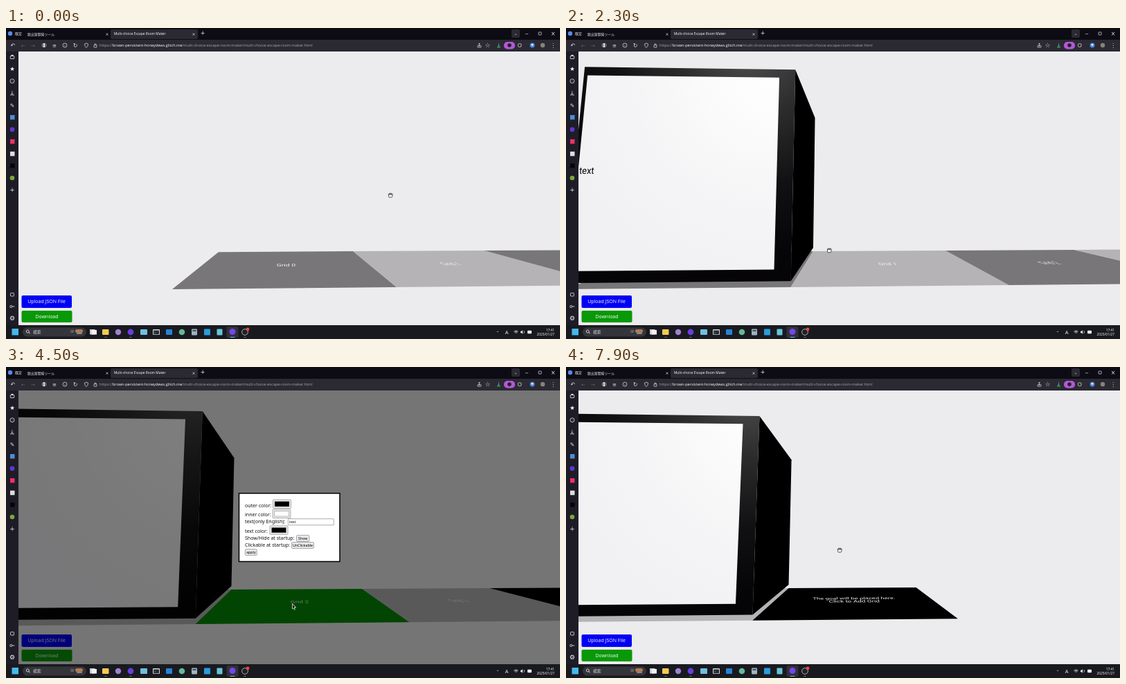
These frames come from a looping animation (800x450 px, 8000 ms). An HTML page with a canvas:

```html
<!DOCTYPE html>
<html lang="ja">
<head>
<meta charset="utf-8">
<title>Room maker</title>
<style>
html, body { margin: 0; width: 100%; height: 100%; overflow: hidden; background: #ecebee }
canvas { display: block; width: 800px; height: 450px }
</style>
</head>
<body>
<canvas id="stage" width="800" height="450"></canvas>
<script>
const g = document.getElementById('stage').getContext('2d');
const UI = '"Open Sans", "Noto Sans", "Noto Sans CJK JP", "Noto Sans CJK", sans-serif';
const SYMBOL = '"DejaVu Sans", sans-serif';
const FORM = '"Noto Sans", "Open Sans", sans-serif';
const LOOP = 8000;

// Time, camera offset
const pan = [[0, 0], [350, 40], [1450, 40], [1700, 109], [2300, 245], [3400, 245], [3700, 330],
  [4300, 628], [5400, 628], [5700, 717], [6100, 909], [7100, 909], [7350, 960], [7900, 1294], [8000, 1310]];
// Time, pointer x, pointer y
const pointer = [[0, 555, 242], [250, 520, 250], [500, 405, 345], [700, 405, 345], [1200, 360, 269],
  [1400, 360, 269], [1550, 452, 288], [1700, 383, 293], [2100, 300, 292], [2450, 440, 344], [2700, 438, 342],
  [3150, 360, 270], [3350, 360, 270], [3600, 560, 270], [4200, 330, 290], [4400, 414, 346], [4600, 414, 346],
  [5100, 360, 270], [5350, 360, 270], [5550, 545, 255], [5700, 461, 257], [6000, 300, 270], [6200, 440, 343],
  [6450, 440, 340], [6850, 361, 270], [7050, 361, 270], [7300, 640, 255], [7900, 395, 265], [8000, 385, 266]];
// When the dialog of each tile opens and is applied
const dialogs = [[500, 1400], [2500, 3400], [4450, 5400], [6200, 7100]];

let camera = 0;

function at(keys, t) {
  let i = 1;
  while (i < keys.length - 1 && keys[i][0] < t) i++;
  const a = keys[i - 1], b = keys[i];
  let p = Math.min(1, Math.max(0, (t - a[0]) / (b[0] - a[0])));
  return a.slice(1).map((v, j) => v + (b[j + 1] - v) * p);
}

function project(x, y, z) {
  const w = 1 + .023 * x + .081 * y + .675 * z;
  return [(240 + 337 * x + 33.5 * y + 274 * z - camera) / w,
          (378 + 5.6 * x - 309 * y + 165 * z) / w];
}

function poly(points, fill) {
  g.fillStyle = fill;
  g.beginPath();
  points.forEach(p => g.lineTo(...p));
  g.closePath();
  g.fill();
}

const face = (points, fill) => poly(points.map(p => project(...p)), fill);

function box(x, y, w, h, fill, r = 0, line) {
  g.beginPath();
  g.roundRect(x, y, w, h, r);
  if (fill) { g.fillStyle = fill; g.fill(); }
  if (line) { g.strokeStyle = line; g.stroke(); }
}

function dot(x, y, r, fill, line) {
  g.beginPath();
  g.arc(x, y, r, 0, 7);
  if (fill) { g.fillStyle = fill; g.fill(); }
  if (line) { g.strokeStyle = line; g.stroke(); }
}

function text(s, x, y, size, fill, align = 'left', font = UI) {
  g.font = size + 'px ' + font;
  g.fillStyle = fill;
  g.textAlign = align;
  g.textBaseline = 'alphabetic';
  g.fillText(s, x, y);
  return x + g.measureText(s).width;
}

const symbol = (s, x, y, size = 8, fill = '#e8e8ee') => text(s, x, y + size * .36, size, fill, 'center', SYMBOL);

// Text lying on a plane, with its own right and up directions
function planeText(s, origin, up, em, emUp, fill, align) {
  const e = .01, o = project(...origin);
  const r = project(origin[0] + e, origin[1], origin[2]);
  const u = project(...origin.map((v, i) => v + up[i] * e));
  const kx = em / 10 / e, ky = -emUp / 10 / e;
  g.save();
  g.transform((r[0] - o[0]) * kx, (r[1] - o[1]) * kx, (u[0] - o[0]) * ky, (u[1] - o[1]) * ky, ...o);
  text(s, 0, 0, 10, fill, align, 'Roboto, sans-serif');
  g.restore();
}

function glow(x, y, r, stops) {
  const c = g.createRadialGradient(x, y, 0, x, y, r);
  stops.forEach((s, i) => c.addColorStop(i / (stops.length - 1), s));
  return c;
}

function tile(i, open) {
  const goal = i === 4;
  const fill = goal ? '#000' : open === i ? '#058c05' : i % 2 ? '#b5b3b5' : '#787678';
  face([[i, 0, 0], [i + 1, 0, 0], [i + 1, 0, 1], [i, 0, 1]], fill);
  const lines = goal ? ['The goal will be placed here.', 'Click to Add Grid'] : ['Grid ' + i];
  lines.forEach((s, n) => planeText(s, [i + .5, 0, (goal ? .52 : .47) - n * .1], [0, 0, 1], .042, .11, '#f4f4f4', 'center'));
}

function cube(i) {
  const lo = .026, hi = 1.026, m = .064, f = -.06;
  face([[i + 1, lo, 0], [i + 1, lo, 1], [i + 1, hi, 1], [i + 1, hi, 0]], '#000');
  face([[i, lo, 0], [i + 1, lo, 0], [i + 1, hi, 0], [i, hi, 0]],
    glow(265, 30, 300, ['#505050', '#2c2c2d', '#111113', '#050507']));
  face([[i + m, lo + m, f], [i + 1 - m, lo + m, f], [i + 1 - m, hi - m, f], [i + m, hi - m, f]],
    glow(300, 60, 330, ['#fff', '#fafafa', '#f4f3f5', '#f1f0f3']));
  planeText('text', [i + .074, .508, -.067], [0, 1, 0], .038, .0415, '#000', 'left');
}

function scene(t, open) {
  box(18, 34, 782, 396, '#ecebee');
  for (let i = 0; i < 5; i++) tile(i, open);
  dialogs.forEach((d, i) => t >= d[1] && cube(i));
  box(22.5, 387, 72.5, 18, '#0000f4', 2);
  text('Upload JSON File', 58.5, 398.3, 7, '#fff', 'center');
  box(22.5, 409, 73, 17, '#089808', 2);
  text('Download', 59, 420, 7, '#fff', 'center');
}

function dialog(pressed) {
  const ink = '#111', edge = '#777';
  const swatch = (x, y, fill) => {
    box(x, y, 26, 12.5, '#efeff0', 1, edge);
    box(x + 2.5, y + 2.5, 21, 7.5, fill, 0, '#888');
  };
  const button = (s, x, y, w, fill = '#e9e9ed') => {
    box(x, y, w, 9, fill, 1.5, edge);
    text(s, x + w / 2, y + 6.4, 5.3, '#000', 'center', FORM);
  };
  box(18, 34, 782, 396, 'rgba(0,0,0,.5)');
  g.lineWidth = 1.5;
  box(336.5, 182.7, 145.5, 98.8, '#fff', 0, '#000');
  g.lineWidth = .6;
  ['outer color:', 'inner color:', 'text(only English):', 'text color:', 'Show/Hide at startup:', 'Clickable at startup:']
    .forEach((s, i) => text(s, 345, [202.5, 216, 226.3, 240, 250, 260.3][i], 7, ink, 'left', FORM));
  swatch(385.5, 192, '#000');
  swatch(385, 206, '#fff');
  swatch(381, 229.8, '#000');
  box(407.3, 219.7, 66, 9, '#fff', .5, edge);
  text('text', 409, 226.2, 5.3, ink, 'left', FORM);
  button('Show', 419.5, 243.4, 18.5);
  button('UnClickable', 412.5, 253.5, 32);
  button('apply', 345.3, 263.6, 17, pressed ? '#b1b1b6' : '#e9e9ed');
}

function browser() {
  const pale = '#e8e8ee', dim = '#67666f';
  box(0, 0, 800, 18, '#0d0c14');
  box(0, 17, 800, 17, '#2b2a33');
  box(0, 34, 18, 396, '#1e1d27');
  dot(6, 8, 3.2, '#5a8ae8');
  text('既定', 13, 10.2, 5, pale);
  text('脱出室開発ツール', 31, 10.5, 4.9, pale);
  box(151, 2, 126, 14, '#2b2a33', 2);
  text('Multi-choice Escape Room Maker', 156, 10.4, 4.85, '#fff');
  symbol('×', 146, 8.5, 6);
  symbol('×', 271, 8.5, 6);
  symbol('+', 284, 7.5, 8);
  box(730, 2, 12, 12, '#2b2a33', 2);
  symbol('⌄', 736, 8, 6);
  symbol('−', 752, 8, 7);
  g.lineWidth = .7;
  box(769, 6, 4, 4, '', .5, pale);
  symbol('×', 790, 8.5, 8);

  symbol('↶', 10, 25);
  symbol('←', 25, 25, 7, dim);
  symbol('→', 39, 25, 7, dim);
  dot(55, 25, 2.8, '', pale);
  box(54, 22.5, 2, 5, pale);
  symbol('≡', 70, 25, 7);
  dot(85, 25, 3, '', pale);
  symbol('‹', 85, 25, 5);
  symbol('↻', 100, 25);
  g.beginPath();
  g.moveTo(113.5, 23); g.lineTo(116, 22); g.lineTo(118.5, 23);
  g.quadraticCurveTo(118.5, 27, 116, 28.5);
  g.quadraticCurveTo(113.5, 27, 113.5, 23);
  g.stroke();
  box(127, 24.7, 4, 3.3, '', .5, pale);
  g.beginPath(); g.arc(129, 24.5, 1.5, Math.PI, 0); g.stroke();
  let x = text('https://', 135, 27.4, 5.55, '#a5a4ad');
  x = text('brown-persistent-honeydews.glitch.me', x, 27.4, 5.55, '#fff');
  text('/multi-choice-escape-room-maker/multi-choice-escape-room-maker.html', x, 27.4, 5.55, '#a5a4ad');
  symbol('↑', 683.5, 24, 7);
  box(681, 25.5, 5, 2.5, '', .5, pale);
  symbol('☆', 695.5, 25, 9);
  symbol('↓', 711.5, 24.5, 7, '#45d990');
  box(709, 27.5, 5, .8, '#45d990');
  box(719, 20, 16, 10.5, '#b657da', 5);
  dot(727, 25, 2.8, '#222');
  box(739.5, 22.8, 4.5, 4.5, '', 1, pale);
  dot(760, 25, 3.4, '#4c8bd9');
  dot(760, 24.3, 1.3, '#fff');
  dot(775, 25, 3.2, '#88827a');
  symbol('⋮', 790, 25);
}

function sidebar() {
  const pale = '#e8e8ee';
  g.lineWidth = .8;
  box(6.3, 40.5, 5.5, 4, '', .5, pale);
  box(7.5, 38.8, 3, 1.5, pale);
  symbol('★', 9, 59.3, 8.5, '#fff');
  dot(9, 76.8, 3, '', pale);
  symbol('‹', 9, 76.4, 4);
  symbol('↓', 9, 93, 7);
  box(6, 96.5, 6, .8, pale);
  symbol('✎', 9, 112, 8);
  box(6, 126, 6.5, 6.5, '#4b8fd5');
  dot(9, 146.8, 3.4, '#5b38d4');
  box(6, 161, 6.5, 6.5, '#f22e69');
  box(6, 178.8, 6.5, 6.5, '#dedee2');
  box(6, 196, 6.5, 6.5, '#050505');
  dot(9, 217, 3.3, '#78a83c');
  symbol('+', 9, 234, 9);
  box(6.5, 383.5, 5, 4.5, '', .8, pale);
  dot(7.3, 403, 1.6, '', pale);
  box(9, 402.6, 3.4, .8, pale);
  symbol('⚙', 9, 420, 9, '#fff');
}

function taskbar() {
  const pale = '#eee';
  box(0, 430, 800, 20, '#191a20');
  box(8.5, 435, 9.5, 9.5, '#44b9ed');
  box(24, 433.5, 92, 13, '#34353b', 6.5);
  g.lineWidth = .8;
  dot(31.3, 439, 2, '', pale);
  poly([[32.5, 440.5], [33, 440], [35, 442], [34.5, 442.5]], pale);
  text('検索', 39, 442.2, 5.8, '#d8d8dc');
  text('SF', 93, 441, 5, '#bbb');
  box(100, 436, 11, 5, '#b17950', 2.5);
  box(102, 441, 8, 2, '#7d8b91', 1);
  box(121, 436, 7.5, 7.5, '#c9cacd');
  box(123.5, 437, 7.5, 6.5, '#f2f2f2');
  box(139, 436, 9.5, 8, '#f5ca50', 1);
  dot(162, 440, 4.2, '#a080d4');
  dot(180, 440, 4.4, '#6540dc');
  box(194, 436, 10, 8, '#70bee0', 1);
  box(212, 436, 10, 8, '#d5d8db', 1);
  box(213, 437.5, 8, 5.8, '#252b31');
  symbol('›', 215, 440, 5);
  box(231, 436, 9, 8, '#2683d4', 1);
  dot(254, 440, 4.3, '#65b995');
  box(268, 435.5, 8, 9, '#a5b2bd', 1);
  box(269.3, 437, 5.4, 2, '#355469');
  box(286, 435.5, 9, 9, '#299cdf', 1);
  box(304.5, 435.5, 8, 9, '#68c3d7', 1);
  box(318.5, 432, 17, 16, '#303139', 2);
  dot(327, 439.5, 4.5, '#7347e8');
  dot(345, 440, 4.4, '#222', '#ccc');
  dot(349, 436, 2.4, '#e44949');
  for (const x of [144, 180, 345]) box(x - 1.5, 447, 3, .8, '#888');
  box(323.5, 447, 7, .9, '#6fbde8', .4);

  symbol('⌃', 710, 441, 6);
  text('A', 723, 443, 7.5, pale, 'center');
  g.strokeStyle = pale;
  for (const r of [1.5, 3, 4.4]) {
    g.beginPath(); g.arc(736.5, 442.5, r, -2.3, -.84); g.stroke();
  }
  poly([[743, 438.8], [744.5, 438.8], [746, 437.2], [746, 442.8], [744.5, 441.2], [743, 441.2]], pale);
  g.beginPath(); g.arc(746, 440, 2.4, -.9, .9); g.stroke();
  box(753, 437.7, 6, 4.5, pale, 1);
  text('17:41', 792, 438.5, 4.8, '#fff', 'right');
  text('2025/01/27', 792, 445, 4.8, '#fff', 'right');
}

function cursor(x, y, hand) {
  g.lineWidth = .8;
  if (hand) {
    box(x - 2.5, y - 1, 5.4, 4, '#fff', 1.5, '#222');
    for (let i = 0; i < 4; i++) box(x - 2.5 + i * 1.4, y - 2.6 + (i % 3 ? -.3 : .3), 1.4, 2.8, '#fff', .7, '#222');
    box(x - 2, y - .6, 4.4, 2.4, '#fff', 1);
    return;
  }
  poly([[-.7, -3.9], [5.2, 2.2], [2.6, 2.5], [3.8, 5], [2, 5.6], [1, 3.1], [-.7, 4.4]].map(p => [x + p[0], y + p[1]]), '#fff');
  poly([[0, -2.3], [3.6, 1.6], [1.7, 1.8], [2.9, 4.4], [2.2, 4.7], [1.1, 2.2], [0, 3]].map(p => [x + p[0], y + p[1]]), '#000');
}

function frame(now) {
  const t = Math.floor(now % LOOP / 100) * 100;
  const open = dialogs.findIndex(d => t >= d[0] && t < d[1]);
  camera = at(pan, t)[0];
  g.save();
  g.beginPath();
  g.rect(18, 34, 782, 396);
  g.clip();
  scene(t, open);
  if (open >= 0) dialog(t >= dialogs[open][1] - 250 && at(pointer, t)[0] < 364);
  g.restore();
  browser();
  sidebar();
  taskbar();
  cursor(...at(pointer, t), open < 0);
}

const start = performance.now();
function tick() {
  frame(performance.now() - start);
  requestAnimationFrame(tick);
}
tick();
</script>
</body>
</html>
```
